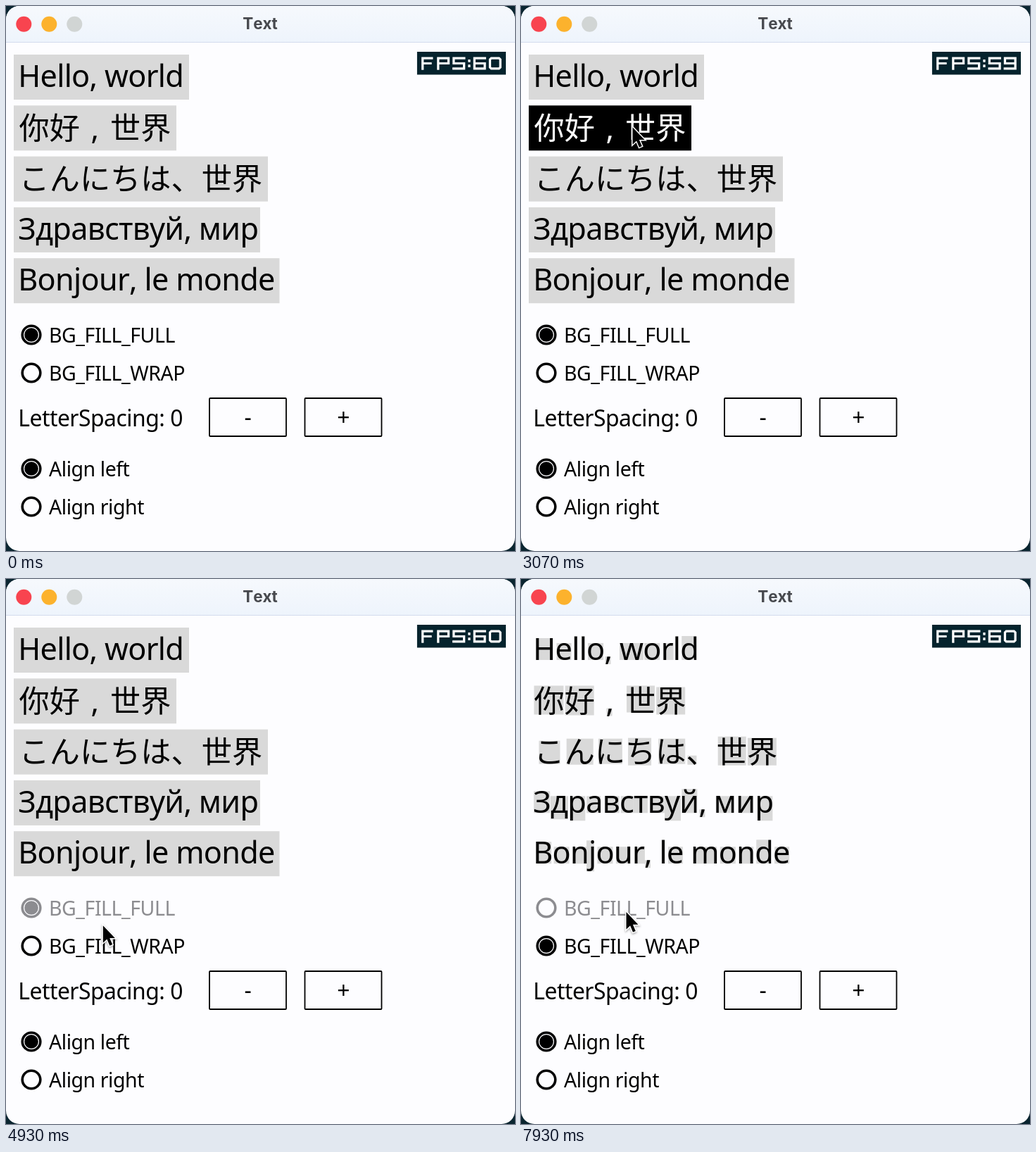
An HTML page with a canvas that plays this animation: 723 by 774 pixels, repeating every 8000 ms.

```html
<!DOCTYPE html>
<html lang="en">
<head>
<meta charset="utf-8">
<title>Text</title>
<style>
html, body { margin: 0; width: 100%; height: 100%; overflow: hidden; background: #0a2530; }
canvas { display: block; }
</style>
</head>
<body>
<canvas id="stage" width="723" height="774"></canvas>
<script>
const ctx = document.getElementById('stage').getContext('2d');
const LOOP = 8000;
const CLICK = 6100;
const HOVER_LAG = 70;
const INK = '#000', PAPER = '#fdfdff', FILL = '#d9d9d9', DIM = '#8c8c90', BADGE = '#05232d';

// Latin and Cyrillic are set slightly tight.
const latin = size => ({
  css: `${size}px "Noto Sans", "Open Sans", sans-serif`,
  spacing: `${-0.016 * size}px`
});
const han = (lang, weight = 400) => ({
  css: `${weight} 43.2px "Noto Sans CJK ${lang}", "Noto Sans CJK", sans-serif`,
  spacing: '0px'
});
const big = latin(43.2), medium = latin(31.9), small = latin(28.5);
const titleFont = { css: 'bold 22.5px Inter, sans-serif', spacing: '0px' };

// Each row is a highlight box plus runs of text: [string, x, font].
const rows = [
  { right: 260, base: 115, runs: [['Hello, world', 17.2, big]] },
  { right: 242, base: 188.5, runs: [['你好', 18.5, han('SC')], [',', 120.5, big], ['世界', 148, han('SC')]] },
  { right: 372, base: 260.7, runs: [['こんにちは、', 18.5, han('JP', 500)], ['世界', 277.7, han('JP')]] },
  { right: 361, base: 332.3, runs: [['Здравствуй, мир', 17.2, big]] },
  { right: 388.5, base: 404.3, runs: [['Bonjour, le monde', 17.2, big]] }
].map((row, i) => ({ ...row, top: 69 + 72.3 * i, height: 64 }));

const radios = [
  { label: 'BG_FILL_FULL', y: 467 },
  { label: 'BG_FILL_WRAP', y: 521 },
  { label: 'Align left', y: 657 },
  { label: 'Align right', y: 711 }
];

// [time, x, y] of the pointer
const track = [
  [1750, 325, -40], [2200, 283.5, 132], [2600, 190, 110], [3070, 158.5, 172], [3470, 156, 228],
  [3800, 152.5, 287], [4270, 143.5, 393], [4700, 139, 464], [5200, 136.5, 525],
  [7400, 136.5, 525], [7850, 149.5, 473], [8000, 149.5, 473]
];

// [start time, frames per second]
const fpsLog = [[0, 60], [600, 61], [1100, 60], [1700, 61], [2500, 60], [2700, 59], [3350, 60]];

// Badge letters as strokes on a unit grid: [width, path]
const glyphs = {
  F: [5, 'M4.5 .5H.5V5M.5 2.5H4'],
  P: [5, 'M.5 5V.5H4.5V2.5H.5'],
  S: [5, 'M5 .5H.5V2.5H4.5V4.5H0'],
  ':': [1, 'M.5 1V2M.5 3V4'],
  0: [5, 'M1 .5H4L4.5 1V4L4 4.5H1L.5 4V1Z'],
  1: [3, 'M0 .5H1.5V4.5M0 4.5H3'],
  5: [5, 'M5 .5H.5V2.5H4.5V4.5H0'],
  6: [5, 'M5 .5H.5V4.5H4.5V2.5H.5'],
  9: [5, 'M0 4.5H4.5V.5H.5V2.5H4.5']
};
const arrow = new Path2D('M0 0V24.5L5.6 19.3L9.5 28.5L13.3 26.9L9.4 17.8H17Z');

function useFont({ css, spacing }) {
  ctx.font = css;
  ctx.letterSpacing = spacing;
  ctx.fontKerning = 'none';
}

function text(str, x, y, font, color = INK, align = 'left') {
  useFont(font);
  ctx.fillStyle = color;
  ctx.textAlign = align;
  ctx.fillText(str, x, y);
}

function rect(x, y, w, h, color) {
  ctx.fillStyle = color;
  ctx.fillRect(x, y, w, h);
}

function disc(x, y, r, color) {
  ctx.beginPath();
  ctx.arc(x, y, r, 0, Math.PI * 2);
  ctx.fillStyle = color;
  ctx.fill();
}

function pointerAt(t) {
  const i = track.findIndex(key => key[0] > t);
  if (i < 1) return null;
  const [t0, x0, y0] = track[i - 1], [t1, x1, y1] = track[i];
  const k = (t - t0) / (t1 - t0);
  return { x: x0 + (x1 - x0) * k, y: y0 + (y1 - y0) * k };
}

function drawWindow() {
  rect(0, 0, 723, 774, '#0a2530');
  ctx.save();
  ctx.beginPath();
  ctx.roundRect(0, 0, 723, 774, 19);
  ctx.clip();
  rect(0, 0, 723, 774, PAPER);
  const bar = ctx.createLinearGradient(0, 0, 0, 51);
  bar.addColorStop(0, '#f6f9fd');
  bar.addColorStop(1, '#eef4fc');
  rect(0, 0, 723, 51, bar);
  rect(0, 51, 723, 1, '#d3dbee');
  ctx.restore();
  ['#f8444f', '#fcb22d', '#d1d5d4'].forEach((color, i) => disc(25.3 + 36 * i, 25.7, 11, color));
  text('Text', 361, 32.5, titleFont, '#47494e', 'center');
}

function drawGlyphBoxes([str, x, font], base) {
  useFont(font);
  ctx.textAlign = 'left';
  [...str].forEach((ch, i, all) => {
    if (ch === ' ') return;
    const left = x + ctx.measureText(all.slice(0, i).join('')).width;
    const m = ctx.measureText(ch);
    rect(left - m.actualBoundingBoxLeft, base - m.actualBoundingBoxAscent,
      m.actualBoundingBoxLeft + m.actualBoundingBoxRight,
      m.actualBoundingBoxAscent + m.actualBoundingBoxDescent, FILL);
  });
}

function drawRow(row, wrap, hover) {
  if (wrap) row.runs.forEach(run => drawGlyphBoxes(run, row.base));
  else rect(11, row.top, row.right - 11, row.height, hover ? INK : FILL);
  for (const [str, x, font] of row.runs) {
    text(str, x, row.base, font, hover && !wrap ? '#fff' : INK);
  }
}

function drawRadio({ label, y }, selected, hover) {
  const color = hover ? DIM : INK;
  disc(36, y, 14.6, color);
  disc(36, y, 11, PAPER);
  if (selected) disc(36, y, 9.8, color);
  text(label, 61, y + 11.2, small, color);
}

function drawButton(x, sign) {
  ctx.strokeStyle = INK;
  ctx.lineWidth = 1.8;
  ctx.beginPath();
  ctx.roundRect(x, 557, 109, 54, 1);
  ctx.stroke();
  text(sign, x + 54.5, 596, medium, INK, 'center');
}

function drawBadge(fps) {
  const unit = 3.68, chars = [...`FPS:${fps}`];
  const width = chars.reduce((sum, ch) => sum + glyphs[ch][0] + 1, -1) * unit;
  rect(698 - width, 65, width + 12, 32.5, BADGE);
  ctx.save();
  ctx.translate(704 - width, 72.3);
  ctx.scale(unit, unit);
  ctx.strokeStyle = '#fff';
  ctx.lineWidth = 0.88;
  for (const ch of chars) {
    const [advance, path] = glyphs[ch];
    ctx.stroke(new Path2D(path));
    ctx.translate(advance + 1, 0);
  }
  ctx.restore();
}

function drawPointer({ x, y }) {
  ctx.save();
  ctx.translate(x, y);
  ctx.lineJoin = 'miter';
  ctx.lineWidth = 3;
  ctx.strokeStyle = '#fff';
  ctx.shadowColor = 'rgba(0,0,0,.35)';
  ctx.shadowBlur = 3;
  ctx.shadowOffsetY = 1.5;
  ctx.stroke(arrow);
  ctx.shadowColor = 'transparent';
  ctx.fillStyle = INK;
  ctx.fill(arrow);
  ctx.restore();
}

function render(now) {
  const t = now % LOOP;
  const wrap = t >= CLICK;
  const pointer = pointerAt(t);
  const probe = pointerAt(t - HOVER_LAG);
  const selected = [!wrap, wrap, true, false];

  drawWindow();
  for (const row of rows) {
    const hover = probe && probe.x > 11 && probe.x < row.right &&
      probe.y > row.top && probe.y < row.top + row.height;
    drawRow(row, wrap, hover);
  }
  radios.forEach((radio, i) =>
    drawRadio(radio, selected[i], probe && probe.x < 253 && Math.abs(probe.y - radio.y) < 20));
  text('LetterSpacing: 0', 17.2, 597, medium);
  drawButton(289, '-');
  drawButton(424.5, '+');
  drawBadge(fpsLog.filter(([start]) => start <= t).pop()[1]);
  if (pointer) drawPointer(pointer);
}

const start = performance.now();
function frame() {
  render(performance.now() - start);
  requestAnimationFrame(frame);
}
frame();
</script>
</body>
</html>
```
